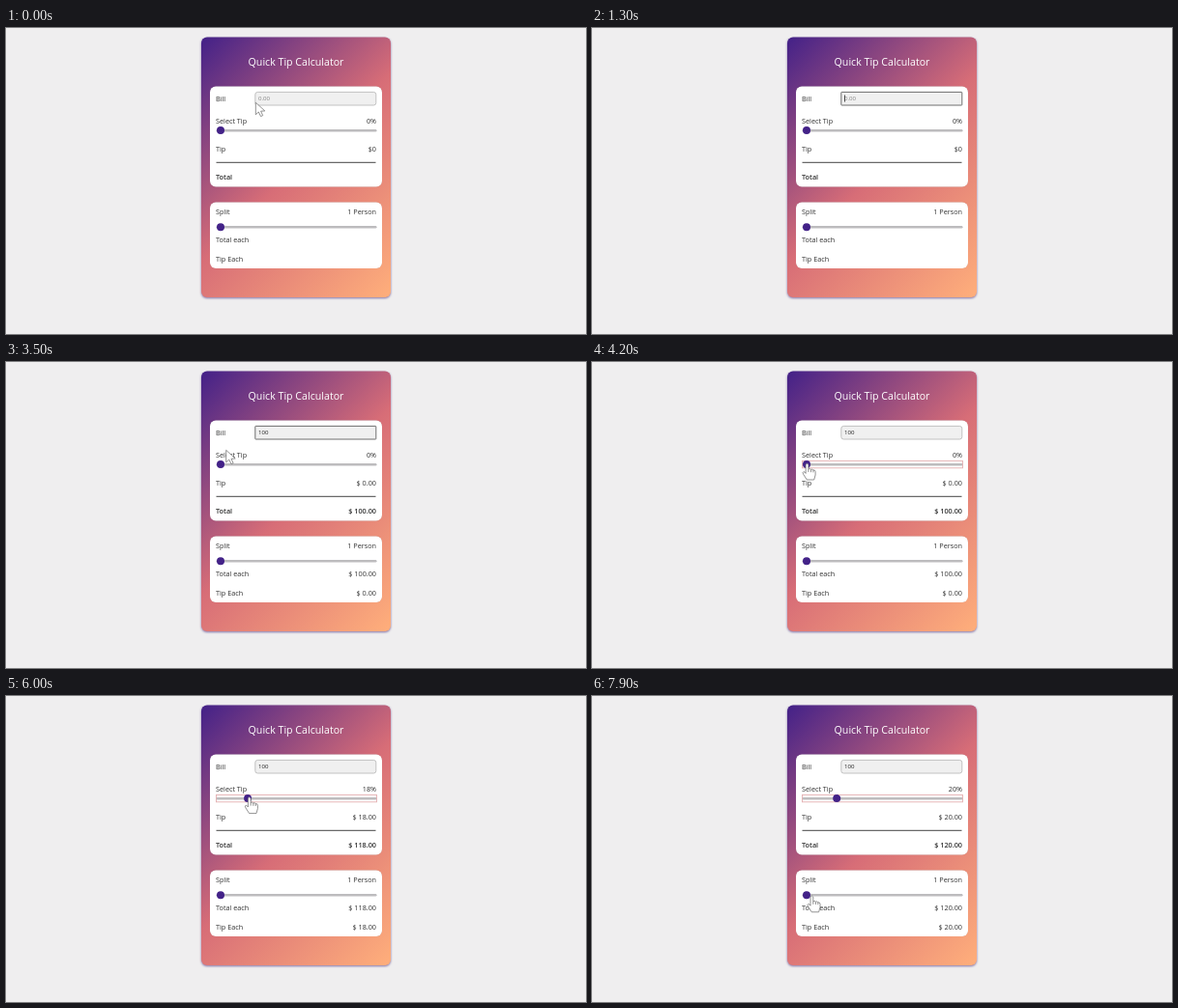
These frames come from a looping animation (600 px wide and 317 px high, 8 s). An HTML page:

```html
<!DOCTYPE html>
<html lang="en">
<head>
<meta charset="utf-8">
<title>Quick Tip Calculator</title>
<style>
  html, body { margin: 0; width: 100%; height: 100%; overflow: hidden; background: #efeeef; }
  svg { display: block; width: 600px; height: 317px; }
  text { font: 7.25px "Open Sans", "Noto Sans", sans-serif; fill: #303030; }
  .title { font-size: 10.65px; font-weight: 500; fill: #fff; }
  .strong { font-weight: 600; }
  .field { font-size: 6.1px; }
  .end { text-anchor: end; }
  .card { filter: drop-shadow(0 1px 1px #3a1c7199); }
  .panel { fill: #fff; filter: drop-shadow(0 .5px .7px #0004); }
  .track { fill: #bdbcbe; }
  .thumb { fill: #432288; }
  .cursor { fill: #fff; stroke: #777; stroke-width: .8; stroke-linejoin: round; }
</style>
</head>
<body>
<svg viewBox="0 0 600 317">
  <defs>
    <linearGradient id="sunset" gradientUnits="userSpaceOnUse" x1="183.5" y1="28" x2="416.5" y2="261">
      <stop offset="0" stop-color="#432188"/>
      <stop offset=".5" stop-color="#d76d77"/>
      <stop offset="1" stop-color="#ffaf7b"/>
    </linearGradient>
  </defs>
  <rect class="card" x="202" y="9.5" width="196" height="269.5" rx="6" fill="url(#sunset)"/>
  <text class="title" x="300" y="38.7" text-anchor="middle">Quick Tip Calculator</text>

  <rect class="panel" x="211" y="60.5" width="178" height="104" rx="6"/>
  <text x="217" y="75.6">Bill</text>
  <rect id="input" x="257.8" y="66.4" width="125" height="13.6" fill="#f0f0f0"/>
  <text id="bill" class="field" x="261" y="75.2"></text>
  <path id="caret" d="M261.5 69.5v7" stroke="#222" stroke-width=".8"/>
  <text x="217" y="98.8">Select Tip</text>
  <text id="percent" class="end" x="383" y="98.8"></text>
  <rect class="track" x="217.5" y="105" width="166" height="2.4" rx="1.2"/>
  <rect id="outline" x="217.5" y="102.4" width="166" height="7.4" fill="none" stroke="#e3aeb0" stroke-width=".9"/>
  <circle id="thumb" class="thumb" cy="106.1" r="4"/>
  <text x="217" y="127.6">Tip</text>
  <text id="tip" class="end" x="383" y="127.6"></text>
  <path d="M217.5 139.3H382.5" stroke="#444" stroke-width="1"/>
  <text class="strong" x="217" y="157.2">Total</text>
  <text id="total" class="strong end" x="383" y="157.2"></text>

  <rect class="panel" x="211" y="180.5" width="178" height="68.5" rx="6"/>
  <text x="217" y="192.8">Split</text>
  <text class="end" x="383" y="192.8">1 Person</text>
  <rect class="track" x="217.5" y="205" width="166" height="2.4" rx="1.2"/>
  <circle class="thumb" cx="222" cy="206.2" r="4"/>
  <text x="217" y="221.7">Total each</text>
  <text id="totalEach" class="end" x="383" y="221.7"></text>
  <text x="217" y="241.8">Tip Each</text>
  <text id="tipEach" class="end" x="383" y="241.8"></text>

  <path id="arrow" class="cursor" d="M0 0V12.6L3 9.8L5.3 14.4L7.4 13.4L5.3 9L9.5 8.7Z"/>
  <g id="hand" class="cursor">
    <path d="M-1.4 1.3Q0 -.8 1.4 1.3V6Q3 4.8 4 6.4Q5.4 5.4 6.4 7Q8.4 6.6 8.6 8.6V12L7.2 17H-.2L-3.8 11.4Q-5.2 9 -3.6 8.6Q-2.6 8.6 -1.4 10.4Z"/>
    <path d="M1.4 6V9M4 6.4V9.2M6.4 7V9.4" fill="none"/>
  </g>
</svg>
<script>
  const LOOP = 8000, STEP = 100;
  const part = id => document.getElementById(id);
  const show = (id, on) => part(id).setAttribute("visibility", on ? "visible" : "hidden");
  const write = (id, value) => { part(id).textContent = value; };
  const set = (id, attrs) => {
    for (const name in attrs) part(id).setAttribute(name, attrs[name]);
  };
  const money = value => "$ " + value.toFixed(2);

  // Keys are [time, ...values], interpolated linearly.
  function along(keys, t) {
    if (t <= keys[0][0]) return keys[0].slice(1);
    for (let i = 1; i < keys.length; i++) {
      const [a, b] = [keys[i - 1], keys[i]];
      if (t <= b[0]) {
        const k = (t - a[0]) / (b[0] - a[0]);
        return a.slice(1).map((v, j) => v + (b[j + 1] - v) * k);
      }
    }
    return keys[keys.length - 1].slice(1);
  }

  const tipKeys = [[4300, 0], [5000, 9], [6000, 18], [6100, 20]];
  const pointerKeys = [
    [0, 258.3, 77.2], [300, 262, 75], [2900, 262, 76], [3500, 227.7, 91.3],
    [4000, 222.5, 105], [4300, 222.5, 105], [5000, 236.6, 105.2],
    [6000, 251.8, 104.6], [6200, 255, 105], [6500, 262, 188],
    [6700, 264, 205], [7300, 259.8, 209.2], [7500, 250, 207.5], [7900, 227.4, 206.8]
  ];

  function draw(t) {
    const typed = "100".slice(0, [1700, 1900, 2100].filter(at => t >= at).length);
    const focused = t >= 900 && t < 4200;
    const percent = Math.round(along(tipKeys, t)[0]);
    const bill = Number(typed), tip = bill * percent / 100;

    set("input", focused
      ? { rx: 0.5, stroke: "#6f6f6f", "stroke-width": 1 }
      : { rx: 2.5, stroke: "#bcbcbc", "stroke-width": 0.9 });
    write("bill", typed || "0.00");
    part("bill").style.fill = typed ? "#222" : "#858585";
    part("caret").setAttribute("transform", `translate(${typed.length * 3.49} 0)`);
    show("caret", focused && Math.floor((t - 1000) / 500) % 2 === 0);

    write("percent", percent + "%");
    set("thumb", { cx: 222 + percent * 1.56 });
    show("outline", t >= 4200);
    write("tip", typed ? money(tip) : "$0");
    write("tipEach", typed ? money(tip) : "");
    for (const id of ["total", "totalEach"]) write(id, typed ? money(bill + tip) : "");

    const [x, y] = along(pointerKeys, t);
    const hand = (t >= 4000 && t < 6300) || t >= 7500;
    const hidden = t >= 300 && t < 2900;
    for (const id of ["arrow", "hand"]) set(id, { transform: `translate(${x} ${y})` });
    show("arrow", !hand && !hidden);
    show("hand", hand);
  }

  const start = performance.now();
  function tick() {
    const t = (performance.now() - start) % LOOP;
    draw(Math.floor(t / STEP) * STEP);
    requestAnimationFrame(tick);
  }
  tick();
</script>
</body>
</html>
```
